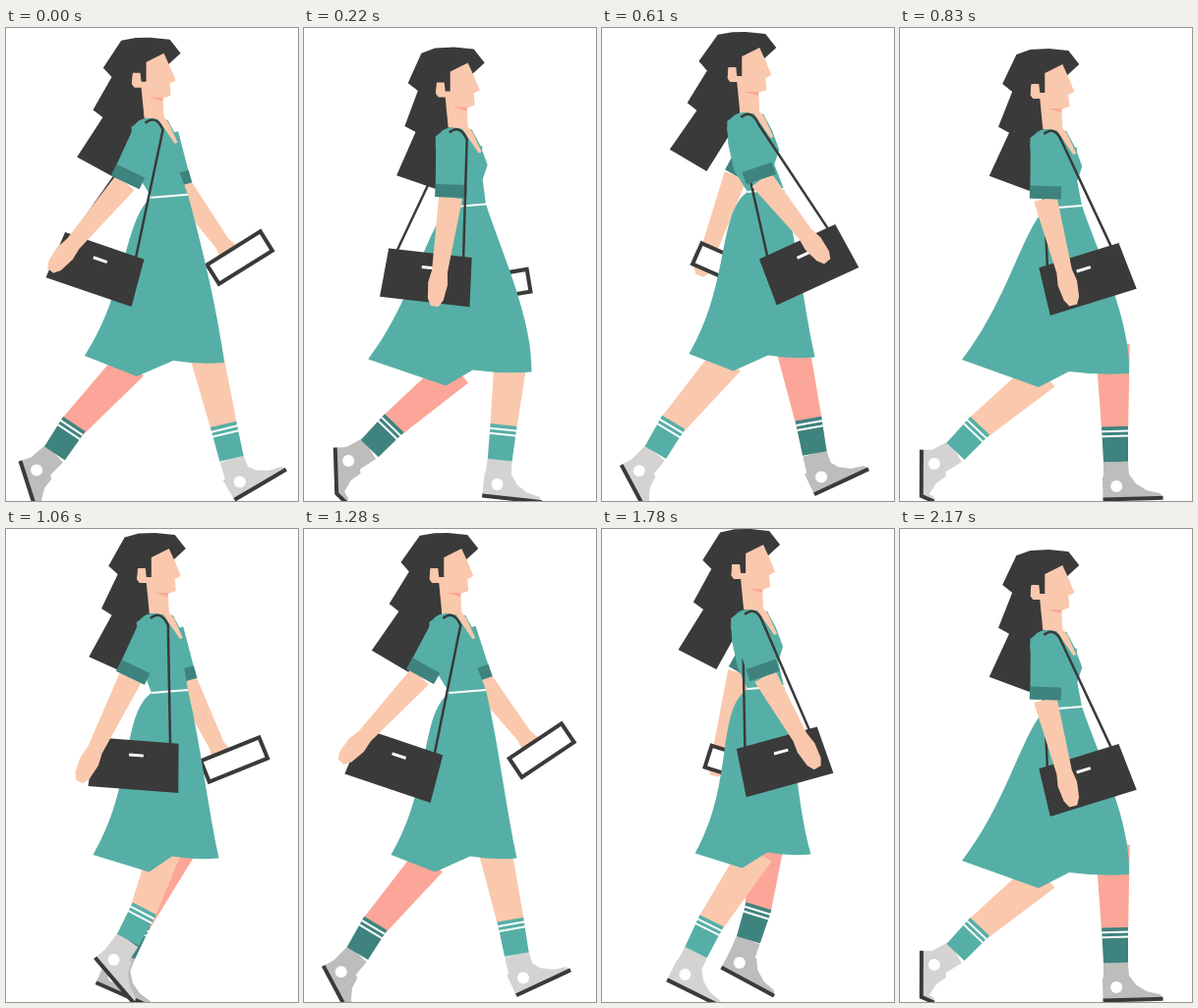
Recreate the animation shown at these times as an HTML page with a canvas. Size 297 by 482 pixels, loop 2.22 s.

```html
<!DOCTYPE html>
<html lang="en">
<head>
<meta charset="utf-8">
<title>Walking woman</title>
<style>
html, body { margin: 0; width: 100%; height: 100%; overflow: hidden; background: #fff; }
canvas { display: block; }
</style>
</head>
<body>
<canvas id="stage" width="297" height="482"></canvas>
<script>
const ctx = document.getElementById('stage').getContext('2d');
const DARK = '#3a3a3a', TEAL = '#56afa6', DEEP = '#3f837e', SKIN = '#fac8ad', PINK = '#fba698';
const LOOP = 2220, FRAMES = 40, STEP = LOOP / FRAMES, CYCLE = 24;
const RAD = Math.PI / 180;

// Swing over a full cycle, highest at the given phase.
const swing = (t, peak) => Math.cos((t - peak) / CYCLE * 2 * Math.PI);

// Single bump around a phase, zero beyond its half width.
function pulse(t, peak, half) {
  const d = Math.abs(((t - peak) % CYCLE + CYCLE * 1.5) % CYCLE - CYCLE / 2);
  return d < half ? Math.cos(d / half * Math.PI / 2) : 0;
}

const mix = (a, b, t) => [a[0] + (b[0] - a[0]) * t, a[1] + (b[1] - a[1]) * t];
const shift = (pts, [x, y]) => pts.map(p => [p[0] + x, p[1] + y]);
// Hangs down at 0 degrees, swings back when positive.
const hang = ([x, y], deg, len) => [x - len * Math.sin(deg * RAD), y + len * Math.cos(deg * RAD)];

function turn(pts, deg, [cx, cy] = [0, 0]) {
  const c = Math.cos(deg * RAD), s = Math.sin(deg * RAD);
  return pts.map(([x, y]) => [cx + (x - cx) * c - (y - cy) * s, cy + (x - cx) * s + (y - cy) * c]);
}

function trace(pts) {
  ctx.beginPath();
  pts.forEach(p => ctx.lineTo(...p));
}

function poly(color, pts) {
  trace(pts);
  ctx.fillStyle = color;
  ctx.fill();
}

function stroke(color, width) {
  ctx.strokeStyle = color;
  ctx.lineWidth = width;
  ctx.stroke();
}

function line(color, width, pts) {
  trace(pts);
  stroke(color, width);
}

function dot(color, [x, y], r) {
  ctx.beginPath();
  ctx.arc(x, y, r, 0, 7);
  ctx.fillStyle = color;
  ctx.fill();
}

// Tapered band along a path.
function strip(color, pts, widths) {
  const left = [], right = [];
  pts.forEach(([x, y], i) => {
    const a = pts[Math.max(i - 1, 0)], b = pts[Math.min(i + 1, pts.length - 1)];
    const d = Math.hypot(b[0] - a[0], b[1] - a[1]) || 1;
    const nx = (a[1] - b[1]) / d * widths[i] / 2, ny = (b[0] - a[0]) / d * widths[i] / 2;
    left.push([x + nx, y + ny]);
    right.unshift([x - nx, y - ny]);
  });
  poly(color, left.concat(right));
}

// The foot follows a stride; ankle, sock and knee are stacked on it.
function leg(t, skin, sock, shoe) {
  const s = swing(2 * t, 6), c = swing(2 * t, 0);
  const foot = [122.5 + 107 * swing(t, 1) + 12 * c + 5 * s, 452.5 + 12 * swing(t, 4) + 4 * c + 3 * s];
  const shin = 19 - 25 * swing(t, 1.3) - 9 * c + 2 * s;
  const flex = 47 * pulse(t, 14.5, 6.5) - 17 * pulse(t, 0, 3);
  const bend = 10 * pulse(t, 11.5, 7) - 9 * pulse(t, 20, 3.5);
  const ankle = hang(foot, shin + .35 * flex, -25);
  const top = hang(ankle, shin, -36);

  strip(skin, [hang(top, shin + bend, -84), mix(top, ankle, .1)], [35, 27]);
  const ball = [33, 12], toe = turn([[44, 8], [47, 12]], -80 * pulse(t, 13.5, 4), ball);
  const place = pts => shift(turn(pts, shin + flex), foot);
  strip(shoe, [ankle, foot], [25, 27]);
  poly(shoe, place([[-14, 12], [-14, -10], [13, -12], [20, -2], [31, 5], ...toe, ball]));
  line(DARK, 4, place([[-14, 13], [33, 13], [toe[1][0], toe[1][1] + 1]]));
  strip(sock, [top, ankle], [27, 25]);
  for (const k of [.13, .27]) strip('#fff', [mix(top, ankle, k - .028), mix(top, ankle, k + .028)], [27, 27]);
  dot('#fff', foot, 6);
}

function armPose(t, shoulder, lean, reach) {
  const upper = swing(t, 21.5), angle = lean + reach * swing(t, 22.6);
  const elbow = hang(shoulder, 5 + 26 * upper, 54);
  const wrist = hang(elbow, angle, 77 + 6 * upper);
  return { shoulder, elbow, wrist, angle };
}

function forearm({ elbow, wrist, angle }, len) {
  const tip = hang(wrist, angle, len);
  strip(SKIN, [elbow, wrist, mix(wrist, tip, .35), mix(wrist, tip, .8), tip], [24, 16, 20, 16, 8]);
}

function sleeve({ shoulder, elbow }, width) {
  strip(TEAL, [shoulder, elbow], [width + 2, width]);
  strip(DEEP, [mix(shoulder, elbow, .76), elbow], [width + 1, width + 1]);
}

function skirt(s, c, [left, right]) {
  const pt = (x, y, dx, dy = 11) => [x + dx * s, y + dy * s];
  const hem = [pt(80, 334, -17, 4), pt(140 - 7 * c, 355, 1), pt(170, 339, 2), pt(222, 341, 11)];
  const mid = mix(hem[2], hem[3], .5);
  ctx.beginPath();
  ctx.moveTo(...left);
  ctx.bezierCurveTo(...pt(120, 194, 5), ...pt(123, 268, -14), ...hem[0]);
  ctx.lineTo(...hem[1]);
  ctx.lineTo(...hem[2]);
  ctx.quadraticCurveTo(mid[0], mid[1] + 3, ...hem[3]);
  ctx.bezierCurveTo(...pt(215, 288, 20), ...pt(200, 225, 4), ...right);
  ctx.fillStyle = TEAL;
  ctx.fill();
}

function draw(t) {
  const s = swing(2 * t, 6), c = swing(2 * t, 0);
  const bob = 11.3 * (s - 1);
  const off = [-2.2 + 1.5 * s - 3.2 * c, bob];
  const at = pts => shift(pts, off);
  const hair = pts => at(turn(pts, 5 - 4.7 * s + 3.5 * c, [140, 50]));
  const waist = shift([[148, 184], [185, 181]], [0, bob]);
  const [shoulder, farShoulder] = at([[150, 120], [168, 120]]);

  ctx.fillStyle = '#fff';
  ctx.fillRect(0, 0, 297, 482);

  const farArm = armPose(t + 12, farShoulder, -9, 29);
  forearm(farArm, 26);
  sleeve(farArm, 24);
  const tablet = (w, h) => shift(
    turn([[-w, -h], [w, -h], [w, h], [-w, h]], farArm.angle + 4), shift([farArm.wrist], [18, 15])[0]);
  poly(DARK, tablet(34, 13.5));
  poly('#fff', tablet(30, 9.5));

  leg(t + 12, PINK, DEEP, '#bdbdbc');
  leg(t, SKIN, TEAL, '#d4d3d2');

  // back hair, dress
  poly(DARK, hair([[105, 57], [115, 65], [101, 101], [112, 107], [92, 151], [133, 166], [156, 108], [150, 52]]));
  poly(TEAL, [...at([[133, 112], [140, 107], [152, 103], [170, 105], [179, 122], [186, 141], [181, 156]]),
    waist[1], waist[0], ...at([[140, 162], [134, 135]])]);
  skirt(s, c, waist);
  line('#fff', 2, waist);

  // face, neckline, front hair
  poly(SKIN, at([[146, 40], [167, 37], [172, 50], [178, 65], [172, 68], [173, 80], [165, 83], [166, 102],
    [171, 108], [180, 128], [177, 129], [160, 104], [146, 103], [143, 72], [136, 72], [133, 68], [134, 57]]));
  poly(PINK, at([[151, 82], [165, 82], [165, 86]]));
  poly(DARK, [...hair([[115, 65], [105, 57], [119, 27], [133, 22]]),
    ...at([[152, 21], [172, 23], [183, 37], [171, 48], [166, 37],
      [148, 46], [148, 66], [143, 66], [142, 57], [134, 57], [133, 70]])]);

  // bag and near arm
  const sway = swing(t, -.3);
  const bag = shift(turn([[-42.5, -25], [42.5, -25], [46, 25], [-46, 25]], -3 + 22 * sway),
    [151 - 59 * sway, 245.5 + 10 * s]);
  const onBag = (x, y) => mix(mix(bag[0], bag[1], x), mix(bag[3], bag[2], x), y);
  const [x, y] = shoulder;
  line(DARK, 2.5, [onBag(.1, .04), [x - 5, y]]);
  poly(DARK, bag);
  line('#fff', 3, [onBag(.42, .3), onBag(.59, .3)]);

  const arm = armPose(t, shoulder, 2, 41);
  forearm(arm, 36);
  dot(TEAL, shoulder, 17);
  sleeve(arm, 31);

  ctx.beginPath();
  ctx.moveTo(x - 3, y - 12);
  ctx.quadraticCurveTo(x + 8, y - 21, x + 15, y - 5);
  ctx.lineTo(...onBag(.9, .04));
  stroke(DARK, 2.5);
}

const start = performance.now();
function tick() {
  const ms = (performance.now() - start) % LOOP;
  draw(Math.min(FRAMES - 1, Math.floor((ms + 5) / STEP)));
  requestAnimationFrame(tick);
}
tick();
</script>
</body>
</html>
```
